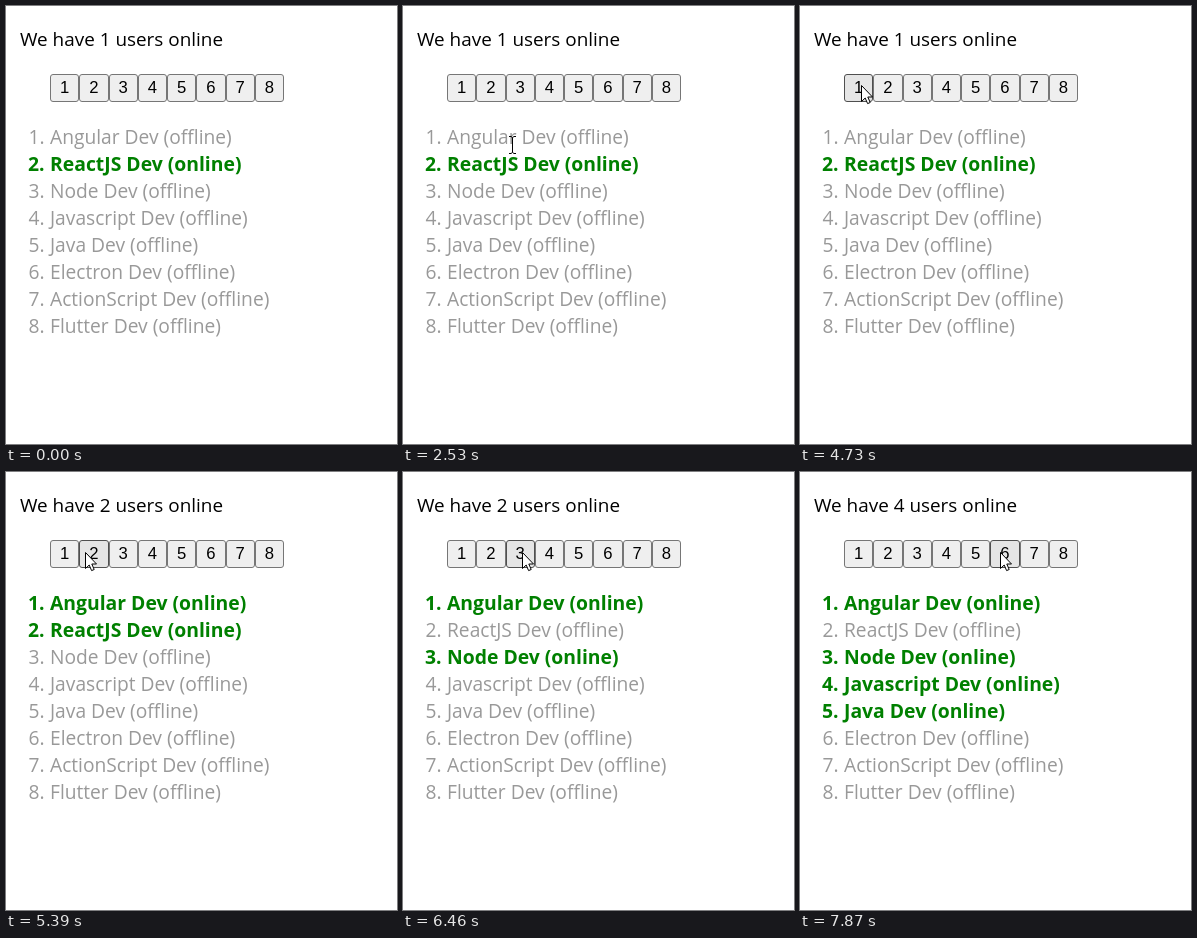
Recreate the animation shown at these times as an HTML page. Size 391x438 px, loop 8 s.

```html
<!DOCTYPE html>
<html lang="en">
<head>
<meta charset="utf-8">
<title>Users online</title>
<style>
  html, body { margin: 0; width: 100%; height: 100%; overflow: hidden; background: #fff; }
  svg { display: block; width: 391px; height: 438px; }
  text { font: 19.2px "Open Sans", "Noto Sans", sans-serif; }
  #title { font-size: 18.9px; }
  .user { fill: #999; }
  .user.online { fill: #008000; }
  .user.online text { font-size: 19.35px; font-weight: 700; }
  .num { text-anchor: end; }
  .button rect { fill: #efefef; stroke: #767676; }
  .button text { font: 16.67px "Liberation Sans", Arial, sans-serif; text-anchor: middle; }
  .button.hover rect { fill: #e5e5e5; stroke: #4f4f4f; }
  .button.active rect { fill: #f5f5f5; stroke: #8d8d8d; }
  #arrow { fill: #fff; stroke: #000; }
  #beam { fill: none; stroke: #000; }
</style>
</head>
<body>
<svg viewBox="0 0 391 438">
  <text id="title" x="14" y="40"></text>
  <g id="buttons"></g>
  <g id="list"></g>
  <g id="cursor">
    <path id="arrow" d="M.5 .5V16.5L4.2 13L6.6 18.6L9.2 17.5L6.8 12H11.5Z"/>
    <path id="beam" d="M-3 -8.5H-1L.5 -7.5L2 -8.5H4M.5 -7.5V7.5M-3 8.5H-1L.5 7.5L2 8.5H4"/>
  </g>
</svg>
<script>
const LOOP = 8000;
const NAMES = ["Angular", "ReactJS", "Node", "Javascript", "Java", "Electron", "ActionScript", "Flutter"];
const LEFT = 44, PITCH = 29.25;

// Way in to the first button: time, x, y
const ENTRY = [
  [1440, 114, -16], [1750, 88, 8], [2230, 104, 17], [2420, 75, 112],
  [2530, 109, 139], [3230, 18, 93], [3460, 70, 74], [3660, 61, 79]
];

// Release times: three clicks on the first button, then one on each next button.
// The last one lies beyond the loop; only the move towards it is seen.
const RELEASES = [4060, 4730, 5260, 5790, 6460, 7130, 7660, 8200];
const HOLD = 130, REST = 200, HOP = 160;
const CLICKS = RELEASES.map((up, n) => ({ up, down: up - HOLD, user: Math.max(0, n - 2) }));

const byId = id => document.getElementById(id);

function ease(k) {
  k = Math.min(1, Math.max(0, k));
  return k * k * (3 - 2 * k);
}

function add(parent, tag, attrs, content = "") {
  const el = document.createElementNS("http://www.w3.org/2000/svg", tag);
  for (const key in attrs) el.setAttribute(key, attrs[key]);
  el.textContent = content;
  return parent.appendChild(el);
}

const buttons = NAMES.map((_, i) => {
  const edge = n => Math.round(LEFT + n * PITCH);
  const left = edge(i), right = edge(i + 1);
  const g = add(byId("buttons"), "g", { class: "button" });
  add(g, "rect", { x: left + .5, y: 68.5, width: right - left - 1, height: 27, rx: 2.5 });
  add(g, "text", { x: LEFT + (i + .5) * PITCH, y: 87 }, i + 1);
  return { g, left, right };
});

const users = NAMES.map((_, i) => {
  const y = 138 + i * 27;
  const g = add(byId("list"), "g", { class: "user" });
  add(g, "text", { class: "num", x: 38.5, y }, `${i + 1}.`);
  return { g, label: add(g, "text", { x: LEFT, y }) };
});

function pointerAt(t) {
  const next = ENTRY.findIndex(p => p[0] > t);
  if (next === 0) return [-99, -99];
  if (next > 0) {
    const [t0, x0, y0] = ENTRY[next - 1], [t1, x1, y1] = ENTRY[next];
    const k = ease((t - t0) / (t1 - t0));
    return [x0 + (x1 - x0) * k, y0 + (y1 - y0) * k];
  }
  // Each hop ends a short rest before the press; strides shorten slightly.
  const hops = CLICKS.filter(c => c.user > 0)
    .reduce((sum, c) => sum + ease((t - c.down + REST + HOP) / HOP), 0);
  return [61 + 30 * hops - .45 * hops * hops, 79 + Math.min(1, hops)];
}

const inside = (x, y, l, t, r, b) => x >= l && x < r && y >= t && y < b;

function draw(t) {
  const online = NAMES.map((_, i) =>
    (i === 1) !== (CLICKS.filter(c => c.user === i && t >= c.up).length % 2 === 1));
  const pressed = CLICKS.find(c => t >= c.down && t < c.up);

  byId("title").textContent = `We have ${online.filter(Boolean).length} users online`;
  users.forEach(({ g, label }, i) => {
    g.classList.toggle("online", online[i]);
    label.textContent = `${NAMES[i]} Dev (${online[i] ? "online" : "offline"})`;
  });

  const [x, y] = pointerAt(t).map(Math.round);
  buttons.forEach(({ g, left, right }, i) => {
    g.classList.toggle("hover", inside(x, y, left, 68, right, 96));
    g.classList.toggle("active", pressed !== undefined && pressed.user === i);
  });

  const overText = inside(x, y, 14, 20, 217, 47) || inside(x, y, LEFT, 118, 266, 334);
  byId("cursor").setAttribute("transform", `translate(${x} ${y})`);
  byId("arrow").style.display = overText ? "none" : "";
  byId("beam").style.display = overText ? "" : "none";
}

function frame() {
  draw(performance.now() % LOOP);
  requestAnimationFrame(frame);
}
frame();
</script>
</body>
</html>
```
